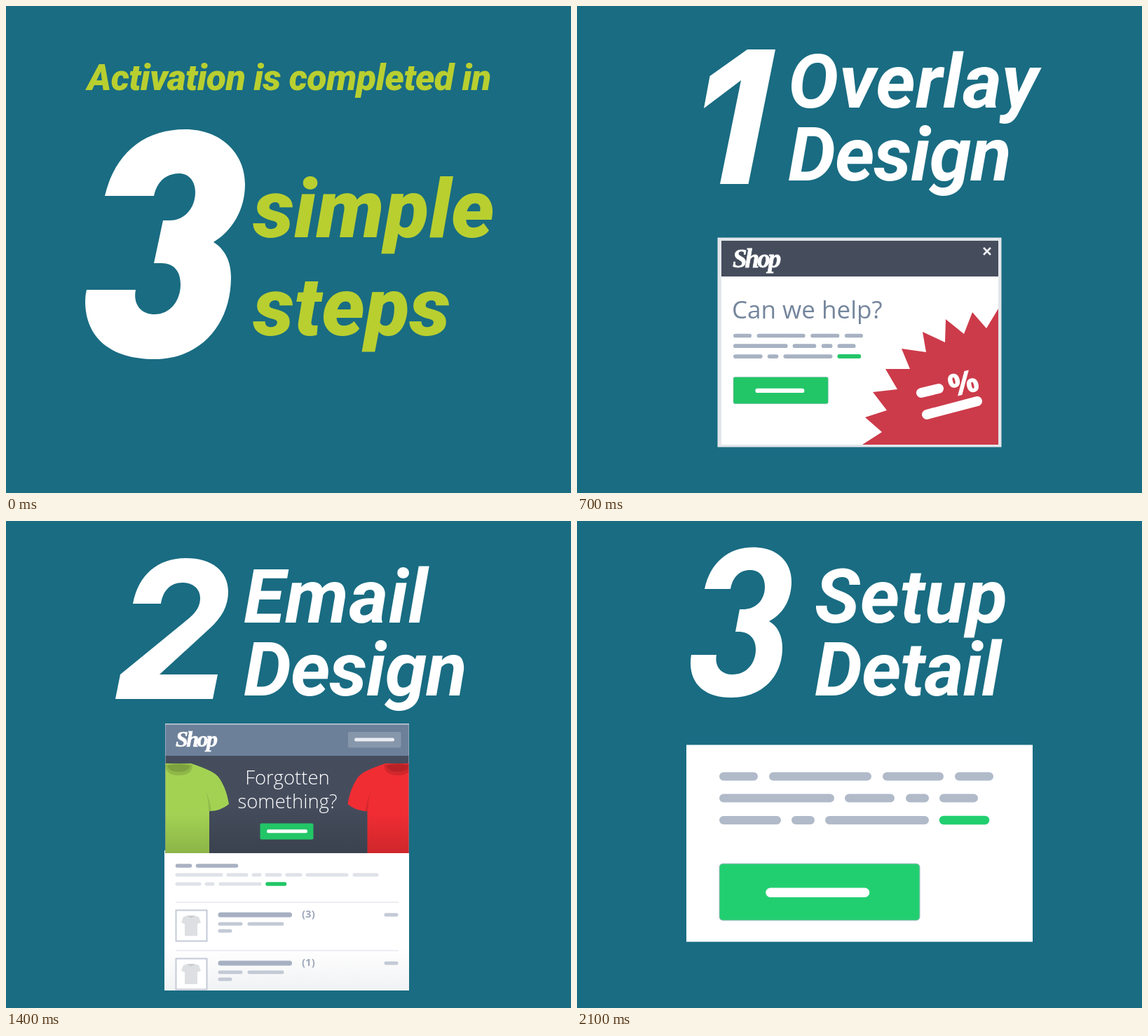
An HTML page for the animation above (2.8 s loop, 806 px wide and 695 px high).

```html
<!DOCTYPE html>
<html lang="en">
<head>
<meta charset="utf-8">
<title>Three simple steps</title>
<style>
  html, body { margin: 0; height: 100%; overflow: hidden; background: #196c82; }
  #stage { display: block; width: 100vw; height: 100vh; }
  .slide { visibility: hidden; }
  .slide.on { visibility: visible; }
  .lead { font: italic 900 52px Roboto, sans-serif; letter-spacing: -.7px; fill: #b9cf30; }
  .big { font: italic 900 116px Roboto, sans-serif; letter-spacing: .5px; fill: #b9cf30; }
  .head { font: italic 700 108px Roboto, sans-serif; letter-spacing: .3px; fill: #fff; }
  .head + .head { letter-spacing: -1.2px; }
  .logo { font: italic 700 37px "Liberation Serif", serif; letter-spacing: -3px; fill: #fff; stroke: #fff; stroke-width: .8; }
  .ask { font: 400 35px "Open Sans", sans-serif; fill: #75869c; }
  .percent { font: 800 45px "Open Sans", sans-serif; fill: #fff; text-anchor: middle; }
  .banner { font: 300 27.5px "Open Sans", sans-serif; fill: #fff; text-anchor: middle; }
  .count { font: 700 15px "Open Sans", sans-serif; fill: #a0aabb; }
  .bar { fill: none; stroke-linecap: round; }
  .digit { fill: #fff; }
</style>
</head>
<body>
<svg id="stage" viewBox="0 0 806 695" xmlns="http://www.w3.org/2000/svg">
  <defs>
    <linearGradient id="fade" x1="0" y1="0" x2="0" y2="1">
      <stop offset="0.7" stop-color="#fff"/><stop offset="1" stop-color="#f1f2f4"/>
    </linearGradient>
    <linearGradient id="night" x1="0" y1="0" x2="0" y2="1">
      <stop offset="0.5" stop-color="#454d5d"/><stop offset="1" stop-color="#3a424f"/>
    </linearGradient>
    <linearGradient id="shade" x1="0" y1="0" x2="0" y2="1">
      <stop offset="0.55" stop-opacity="0"/><stop offset="1" stop-opacity=".14"/>
    </linearGradient>

    <!-- Text lines and button: bars inherit stroke, the accent uses color -->
    <g id="copy">
      <path class="bar" stroke-width="12" d="M209 364.5H252M280 364.5H414M442 364.5H517M545 364.5H588
        M209 395.5H361M388 395.5H447M475 395.5H496M523 395.5H566M209 427H285M312 427H333M360 427H496"/>
      <path class="bar" stroke-width="12.5" style="stroke:currentColor" d="M523 427H582"/>
      <rect x="203" y="489" width="286" height="81" rx="5" fill="currentColor"/>
      <path class="bar" stroke-width="13.5" style="stroke:#fff" d="M276 530.2H410.5"/>
    </g>

    <!-- The shirt takes the inherited fill -->
    <path id="body" d="M220 346H264C284 353 299 358 305 368C312 379 316 391 318 404Q306 414 290 414V474H220Z"/>
    <g id="shirt">
      <use href="#body"/>
      <use href="#body" fill="url(#shade)"/>
      <path d="M289 414Q289 394 283 381Q291 397 293 413Z" fill="#000" opacity=".1"/>
      <path d="M227 348Q246 343 266 348Q266 363 246 363Q228 363 227 348Z" fill="#000" opacity=".13"/>
      <path d="M230 349Q246 345 263 349Q260 358 246 358Q233 358 230 349Z" fill="#000" opacity=".12"/>
    </g>

    <g id="item">
      <path d="M242 544H560" stroke="#eceef2" stroke-width="2"/>
      <rect x="242.5" y="555.5" width="44" height="44" fill="#fff" stroke="#c3cad7" stroke-width="2"/>
      <path d="M259 563Q264 566 269 563L275 565L278 573L273 575V592H255V575L250 573L253 565Z" fill="#dedfe2"/>
      <path d="M259 563Q264 570 269 563" fill="#cbcdd1"/>
      <path class="bar" stroke="#a6b0c2" stroke-width="7" d="M306 562H404.5"/>
      <path class="bar" stroke="#c3cad6" stroke-width="5" d="M305 575H335M347 575H394M305 585H320M542 562H557"/>
    </g>
  </defs>

  <g class="slide on">
    <text class="lead" x="116" y="120">Activation is completed in</text>
    <path class="digit" d="M141 271C155 212 195 176 256 176C306 176 341 210 341 254C341 292 322 321 296 337
      C312 347 321 364 321 387C321 455 277 504 212 504C150 504 113 474 113 421Q113 413 115 405H185
      C181 425 192 440 212 440C234 440 249 421 249 397C249 378 239 367 222 367H211L224 306H234
      C255 306 270 288 270 266C270 250 261 239 247 239C228 239 215 251 211 271Z"/>
    <text class="big" x="353" y="330">simple</text>
    <text class="big" x="353" y="470">steps</text>
  </g>

  <g class="slide">
    <path class="digit" d="M243 62H283L244.5 254H204L234 106L181 146L189.5 100Z"/>
    <text class="head" x="301" y="145">Overlay</text>
    <text class="head" x="301" y="249">Design</text>
    <rect x="200.5" y="330.5" width="405" height="299" fill="#e3e6ea"/>
    <rect x="206" y="335" width="395" height="291" fill="#fff"/>
    <rect x="206" y="335" width="395" height="51" fill="#454d5d"/>
    <text class="logo" x="222" y="373">Shop</text>
    <path d="M580 345L590 355M590 345L580 355" stroke="#eef0f3" stroke-width="2.6"/>
    <text class="ask" x="221" y="446">Can we help?</text>
    <use href="#copy" transform="translate(127 298.1) scale(.473)" stroke="#a7b2c3" color="#22c667"/>
    <path fill="#cc3b4a" d="M601 432L584 460L564 437L552 468L526 447L525 480L493 465L498 494L463 489L475 518
      L440 518L457 547L422 551L442 577L411 587L435 608L407 626H601Z"/>
    <path class="bar" stroke="#fff" stroke-width="14" d="M491 552L516 546M499 583L571 564"/>
    <text class="percent" transform="translate(551 538) rotate(-14)" y="16">%</text>
  </g>

  <g class="slide">
    <path class="digit" d="M181 118C189 76 217 53 257 53C293 53 317 71 317 101C317 122 307 138 292 152L219 219H302
      L295 254H156L163 219L262 138C271 130 277 122 277 110C277 97 267 88 251 88C235 88 224 99 221 118Z"/>
    <text class="head" x="339" y="145">Email</text>
    <text class="head" x="339" y="249">Design</text>
    <svg x="226" y="289" width="349" height="381" viewBox="226 289 349 381">
      <rect x="226" y="470" width="349" height="200" fill="url(#fade)"/>
      <rect x="227" y="289" width="348" height="185" fill="#c5ced9"/>
      <rect x="227.5" y="290.5" width="347" height="45" fill="#6c8099"/>
      <rect x="227.5" y="335" width="347" height="139" fill="url(#night)"/>
      <text class="logo" transform="translate(242 322) scale(.87)">Shop</text>
      <rect x="488" y="301" width="75.5" height="22.5" rx="2" fill="#8696ab"/>
      <path class="bar" stroke="#e9ecf0" stroke-width="5" d="M499.5 312H551.5"/>
      <svg x="227.5" y="335" width="347" height="139" viewBox="227.5 335 347 139">
        <use href="#shirt" fill="#a3d253"/>
        <use href="#shirt" fill="#f02d33" transform="translate(805.5 0) scale(-1 1)"/>
      </svg>
      <text class="banner" x="401.5" y="376">Forgotten</text>
      <text class="banner" x="401.5" y="409.5">something?</text>
      <rect x="362.5" y="431.5" width="76" height="23" rx="2" fill="#22c667"/>
      <path class="bar" stroke="#fff" stroke-width="5" d="M374.5 442.7H427.5"/>
      <path class="bar" stroke="#a9b2c3" stroke-width="5.5" d="M244.5 492H262.5M273.5 492H328.5"/>
      <path class="bar" stroke="#dfe2e8" stroke-width="5" d="M244 505H307M317 505H343M353 505H362M372 505H391
        M401 505H420M430 505H486M497 505H529M244 518H276M286 518H295M306 518H362"/>
      <path class="bar" stroke="#22c667" stroke-width="5.5" d="M373 518H397.5"/>
      <use href="#item"/>
      <use href="#item" y="69"/>
      <text class="count" x="422" y="566">(3)</text>
      <text class="count" x="422" y="635">(1)</text>
    </svg>
  </g>

  <g class="slide">
    <path class="digit" d="M182 97C190 60 215 37.5 252 37.5C285 37.5 306 58 306 86C306 112 294 133 274 143
      C286 150 293 163 293 181C293 221 265 252 220 252C184 252 162 234 162 203Q162 196 163 191H199
      C196 207 205 219 222 219C242 219 255 203 255 183C255 168 246 158 230 158H226L232 126H237
      C256 126 268 112 268 94C268 79 260 70 247 70C232 70 222 80 219 97Z"/>
    <text class="head" x="339" y="145">Setup</text>
    <text class="head" x="339" y="249">Detail</text>
    <rect x="156" y="319.5" width="494" height="281" fill="#fff"/>
    <use href="#copy" stroke="#b0bac9" color="#22cf70"/>
  </g>
</svg>
<script>
  const HOLD = 700;
  const slides = [...document.querySelectorAll('.slide')];

  function draw() {
    const current = Math.floor(performance.now() / HOLD) % slides.length;
    slides.forEach((slide, i) => slide.classList.toggle('on', i === current));
    requestAnimationFrame(draw);
  }
  draw();
</script>
</body>
</html>
```
